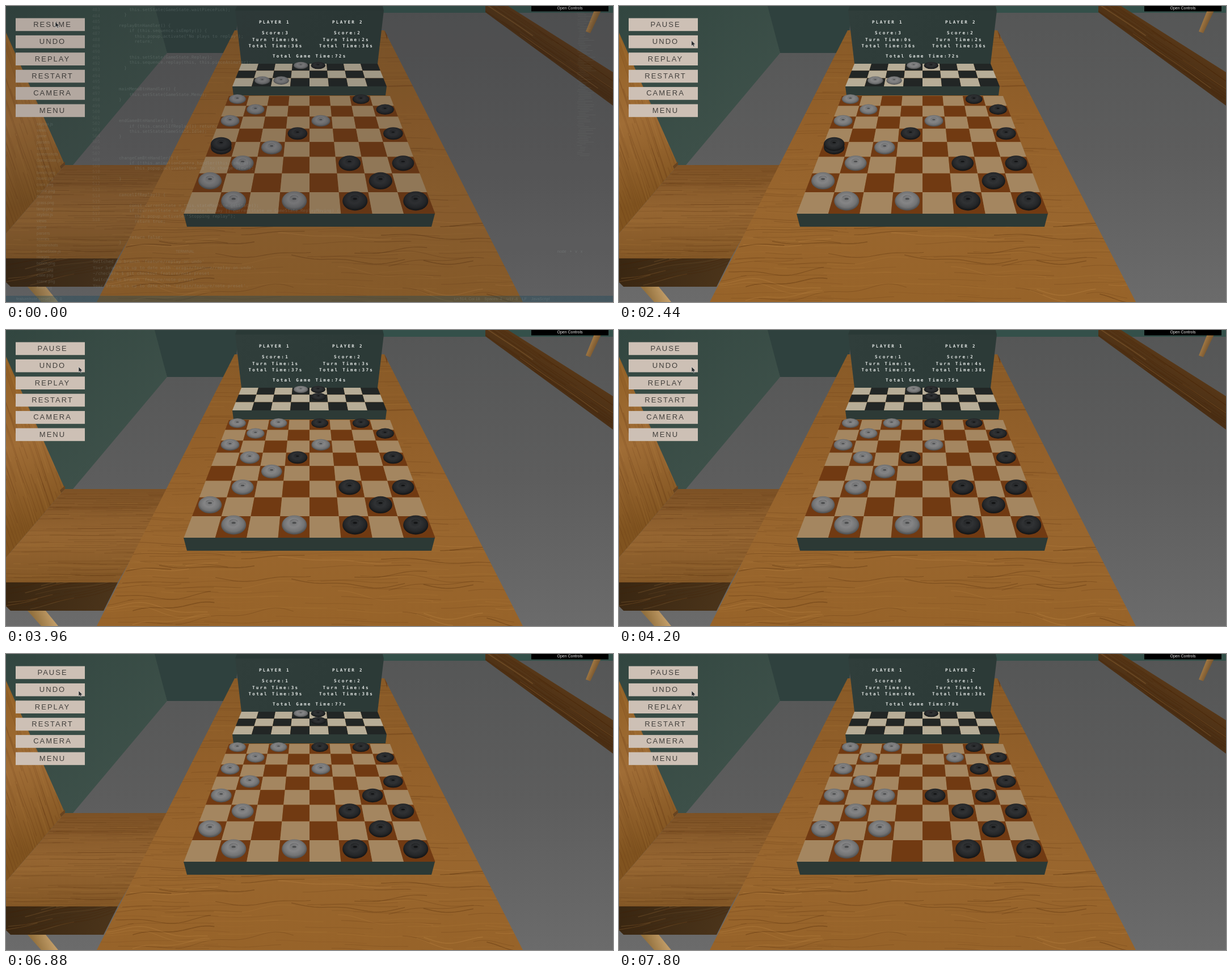
Recreate the animation shown at these times as an HTML page with a canvas. Size 1070 px wide and 523 px high, loop 8000 ms.

```html
<!DOCTYPE html>
<html lang="en">
<head>
<meta charset="utf-8">
<title>Checkers undo</title>
<style>
html, body { margin: 0; width: 100%; height: 100%; overflow: hidden; background: #555; }
canvas { display: block; }
</style>
</head>
<body>
<canvas id="stage" width="1070" height="523"></canvas>
<script>
const W = 1070, H = 523, LOOP = 8000;
const stage = document.getElementById('stage').getContext('2d');
let g = stage;

const SANS = '"Liberation Sans", Arial, sans-serif';
const MONO = '"DejaVu Sans Mono", monospace';

function random(seed) {
  return () => (seed = (seed * 16807) % 2147483647) / 2147483647;
}

function layer(paint) {
  const c = document.createElement('canvas');
  c.width = W;
  c.height = H;
  g = c.getContext('2d');
  paint();
  g = stage;
  return c;
}

function trace(p) {
  g.beginPath();
  for (let i = 0; i < p.length; i += 2) g.lineTo(p[i], p[i + 1]);
  g.closePath();
}

function poly(p, fill) {
  trace(p);
  g.fillStyle = fill;
  g.fill();
}

function fade(x0, y0, x1, y1, ...colors) {
  const grad = g.createLinearGradient(x0, y0, x1, y1);
  colors.forEach((c, i) => grad.addColorStop(i / (colors.length - 1), c));
  return grad;
}

function text(s, x, y, font, color, spacing = 0, align = 'left') {
  g.font = font;
  g.letterSpacing = spacing + 'px';
  g.fillStyle = color;
  g.textAlign = align;
  g.textBaseline = 'middle';
  g.fillText(s, x, y);
}

// Wavy streaks running along an angle, clipped to a polygon
function grain(p, { x, y, w, h, angle = 0, count, seed, alpha, bend }) {
  const rnd = random(seed);
  g.save();
  trace(p);
  g.clip();
  g.translate(x, y);
  g.rotate(angle);
  for (let i = 0; i < count; i++) {
    const depth = rnd(), y0 = depth * h, x0 = rnd() * w - 40;
    const len = 50 + rnd() * 170, phase = rnd() * 6;
    const amp = bend * (0.3 + depth);
    g.beginPath();
    for (let s = 0; s <= len; s += 8) {
      const u = x0 + s;
      g.lineTo(u, y0 + amp * Math.sin(u / 55 + phase) + amp * 0.4 * Math.sin(u / 19));
    }
    g.lineWidth = 0.6 + rnd() * 1.1;
    g.strokeStyle = rnd() < 0.7 ? `rgba(70,34,6,${alpha})` : `rgba(205,150,80,${alpha * 0.7})`;
    g.stroke();
  }
  g.restore();
}

// Perspective grid of 8 columns: y range and half widths at both ends
function grid(y0, y1, h0, h1, rows) {
  return (r, c) => {
    const k = 1 / (1 / h0 + (1 / h1 - 1 / h0) * r / rows);
    return [535 + (c - 4) * k / 4, y0 + (k - h0) / (h1 - h0) * (y1 - y0), k];
  };
}
const board = grid(159, 367, 142, 221.5, 8);
const tray = grid(102, 142, 120, 136, 3);

function checker(at, rows, even, odd) {
  for (let r = 0; r < rows; r++) {
    for (let c = 0; c < 8; c++) {
      const cell = [[r, c], [r, c + 1], [r + 1, c + 1], [r + 1, c]];
      poly(cell.flatMap(([a, b]) => at(a, b).slice(0, 2)), (r + c) % 2 ? odd : even);
    }
  }
}

function paintRoom() {
  g.fillStyle = fade(0, 0, 0, H, '#555656', '#5d5d5d', '#6b6b6b');
  g.fillRect(0, 0, W, H);
  poly([0, 0, 265, 0, 284, 83, 118, 281, 0, 281], fade(0, 0, 200, 200, '#324640', '#3d5049'));
  poly([262, 0, 410, 0, 403, 83, 284, 83], '#2f413e');
  poly([660, 0, W, 0, W, 12, 660, 12], '#34504a');

  const beam = [845, 0, 885, 0, W, 117, W, 176, 845, 11];
  poly([1040, 0, 1053, 0, 1030, 48, 1022, 45], fade(1028, 20, 1042, 26, '#ad8148', '#76552e'));
  poly(beam, fade(930, 80, 960, 30, '#4a2f15', '#5c3a18'));
  grain(beam, { x: 840, y: -25, w: 300, h: 75, angle: 0.6, count: 45, seed: 5, alpha: 0.3, bend: 1.5 });

  const back = [0, 47, 104, 281, 0, 402];
  poly(back, fade(0, 60, 90, 330, '#936126', '#a06d36', '#80531f'));
  grain(back, { x: 0, y: 20, w: 360, h: 160, angle: 1.25, count: 60, seed: 8, alpha: 0.14, bend: 1 });
  grain(back, { x: 100, y: 60, w: 360, h: 160, angle: 1.25, count: 60, seed: 9, alpha: 0.14, bend: 1 });

  poly([38, 496, 70, 496, 92, H, 62, H], fade(50, 512, 78, 500, '#93713e', '#c09b66'));
  const seat = [104, 281, 290, 281, 197, 446, 0, 446, 0, 402];
  poly(seat, fade(0, 281, 0, 446, '#7c5125', '#956531', '#835726'));
  grain(seat, { x: 0, y: 281, w: 300, h: 165, count: 150, seed: 12, alpha: 0.13, bend: 1 });
  const front = [0, 446, 197, 446, 172, 496, 8, 496, 0, 488];
  poly(front, fade(0, 446, 197, 496, '#392611', '#4c351b'));
  grain(front, { x: 0, y: 446, w: 200, h: 50, angle: -0.2, count: 30, seed: 15, alpha: 0.25, bend: 3 });
  poly([95, 283, 104, 275, 104, 281, 97, 288], '#684420');

  const table = [403, 43, 667, 43, 911, H, 160, H];
  poly(table, fade(0, 43, 0, H, '#885a27', '#93602a', '#99662e', '#976329'));
  grain(table, { x: 150, y: 43, w: 780, h: 480, count: 260, seed: 21, alpha: 0.13, bend: 2 });
  grain(table, { x: 150, y: 380, w: 780, h: 145, count: 42, seed: 32, alpha: 0.3, bend: 9 });
  poly([667, 43, 672, 52, 672, 60], '#6d401c');

  poly([407, 0, 664, 0, 666, 8, 404, 8], '#2a3936');
  poly([404, 8, 666, 8, 655, 102, 415, 102], fade(404, 8, 600, 102, '#303e3b', '#2c3a37'));
  checker(tray, 3, '#b7ad97', '#222625');
  poly([399, 142, 671, 142, 669, 158, 401, 158], '#2d3a36');
  checker(board, 8, '#713a12', '#a48660');
  poly([313, 367, 756, 367, 750, 390, 319, 390], '#2c3935');

  g.fillStyle = '#000';
  g.fillRect(926, 0, 136, 9.5);
  text('Open Controls', 994, 4, '7px ' + SANS, '#e8e8e8', 0, 'center');
}

const CODE = `    this.setState(GameState.waitPiecePick);
  }

replayBtnHandler() {
    if (this.sequence.isEmpty()) {
      this.popup.activate("No plays to replay");
      return;

    this.setState(GameState.Replay);
    this.sequence.replay(this, this.pieceAnimator);
  }

mainMenuBtnHandler() {
    this.setState(GameState.Menu);
}

endGameBtnHandler() {
    if (this.cancelIfReplay()) return;
    this.setState(GameState.Idle);
}

changeCamBtnHandler() {
    if (!this.animationCamera.handler(this.camera))
      this.popup.activate("Use 'z' to change view");

}

cancelIfReplay() {
    const currentState = this.stateMachine.getState();
    if (currentState == GameState.Replay || currentState == GameState.ReplayMoving) {
      this.popup.activate("Stopping replay");
      return true;

    return false;
}`.split('\n');
// Rows left blank before each code line would otherwise break the pitch
const CODE_GAPS = { 8: 1, 12: 2, 16: 2, 20: 2, 26: 1, 28: 1, 33: 1 };
const FILES = ['skybox.js', 'views', 'game', 'parsers', 'scenes', 'screenshots', 'GameState.js', 'images', 'bench.png', 'board.jpg', 'crate.png', 'scene.png', 'floor.png', 'grass.png', 'lamp.png'];
const TERMINAL = [
  "Switched to branch 'feature/replay-on-undo'",
  "Your branch is up to date with 'origin/feature/replay-on-undo'.",
  '~/checkers $ git checkout feature/note-preset',
  "Switched to branch 'feature/note-preset'",
  "Your branch is up to date with 'origin/feature/note-preset'."
];

function paintPause() {
  g.fillStyle = 'rgba(35,38,42,.15)';
  g.fillRect(0, 0, W, H);
  g.fillStyle = 'rgba(22,72,92,.35)';
  g.fillRect(0, 512, W, 11);
  const ink = 'rgba(165,175,170,.24)', font = '7.6px ' + MONO;
  let row = 0;
  CODE.forEach((line, i) => {
    row += CODE_GAPS[i] || 0;
    text(line, 199, 7 + row++ * 9.35, font, ink);
  });
  for (let i = 0; i < 36; i++) text(String(483 + i), 152, 7 + i * 10.6, font, 'rgba(165,175,170,.15)');
  for (let i = 0; i < 28; i++) text(FILES[i % 15], 54, 209 + i * 10.7, '7px ' + SANS, ink);
  text('TERMINAL', 299, 434, '6.5px ' + SANS, ink);
  TERMINAL.forEach((line, i) => text(line, 153, 452 + i * 10.7, font, ink));
  text('feature/note-preset     0  0', 18, 518, '7px ' + SANS, ink);
  text('Ln 514, Col 18    Spaces: 4    UTF-8    LF    JavaScript', 790, 518, '7px ' + SANS, ink);
  text('node   +   v   x', 972, 434, '7px ' + SANS, ink);
  const rnd = random(40);
  g.fillStyle = 'rgba(170,180,170,.08)';
  for (let y = 12; y < 265; y += 3) g.fillRect(1006 + rnd() * 6, y, 8 + rnd() * 22, 1);
}

function piece(at, r, c, dark, lift = 0) {
  const [x, y, k] = at(r + 0.5, c + 0.5);
  const rx = k * 0.103, ry = rx * (0.57 + (k - 145) / 345);
  const [hi, mid, low] = dark ? ['#303234', '#242628', '#121314'] : ['#858586', '#727374', '#4b4c4d'];
  g.save();
  g.translate(x, y - 3 - lift);
  g.scale(rx, ry);
  const grad = g.createRadialGradient(-0.1, -0.25, 0, 0, -0.1, 1.1);
  grad.addColorStop(0, mid);
  grad.addColorStop(0.4, hi);
  grad.addColorStop(0.75, mid);
  grad.addColorStop(1, low);
  g.fillStyle = grad;
  g.beginPath();
  g.arc(0, 0, 1, 0, 7);
  g.fill();
  g.fillStyle = low;
  g.beginPath();
  g.ellipse(0, -0.22, 0.16, 0.1, 0, 0, 7);
  g.fill();
  g.strokeStyle = low;
  g.lineWidth = 0.05;
  g.globalAlpha = 0.5;
  g.beginPath();
  g.arc(0, -0.2, 0.36, 3.6, 5.8);
  g.stroke();
  g.restore();
}

const RESUME = 2320, UNCROWN = 2680;
const LIGHT = '00 11 20 24 42 51 60 71 73', DARK = '06 17 33 37 40 55 57 66 75 77';
// Undone moves: time, from, to, captured squares given back
const UNDO = [
  [UNCROWN, '40', '04', '13 31'],
  [3960, '13', '02'],
  [5000, '55', '46'],
  [5600, '51', '40'],
  [6080, '33', '44'],
  [6440, '42', '51'],
  [6760, '44', '55'],
  [7040, '24', '42', '33'],
  [7280, '33', '44'],
  [7520, '73', '62'],
  [7720, '04', '26', '15']
];
// Clock ticks: time, player
const TICKS = [[2480, 1], [3120, 0], [4200, 1], [5320, 0], [6440, 0], [7520, 0]];

function position(t) {
  const squares = new Map();
  const put = (list, dark) => list.split(' ').forEach(s => squares.set(s, dark));
  put(LIGHT, false);
  put(DARK, true);
  const score = [3, 2];
  for (const [time, from, to, back] of UNDO) {
    if (t < time) break;
    const dark = squares.get(from);
    squares.delete(from);
    squares.set(to, dark);
    if (back) {
      put(back, !dark);
      score[dark ? 0 : 1] -= back.split(' ').length;
    }
  }
  return { squares, score };
}

function drawPieces(t, { squares, score }) {
  const crowned = t < UNCROWN;
  [[0, 3], [2, 1], [2, 2]].slice(0, score[0]).forEach(([r, c]) => piece(tray, r, c, false));
  [[0, 4], [1, 4]].slice(0, crowned ? 1 : score[1]).forEach(([r, c]) => piece(tray, r, c, true));
  for (const [square, dark] of [...squares].sort()) {
    const [r, c] = [...square].map(Number);
    piece(board, r, c, dark);
    if (crowned && square === '40') piece(board, r, c, true, 6);
  }
}

function drawScores(t, score) {
  const ticks = [0, 0];
  for (const [time, player] of TICKS) if (t >= time) ticks[player]++;
  const line = (s, x, y) => text(s, x, y, 'bold 7.6px ' + MONO, '#e4e8e6', 2.3);
  [0, 1].forEach(p => {
    const x = p * 124.5;
    line('PLAYER ' + (p + 1), 446 + p * 129, 29);
    line('Score:' + score[p], 451 + p * 127, 48.5);
    line(`Turn Time:${p * 2 + ticks[p]}s`, 434 + x, 60);
    line(`Total Time:${36 + ticks[p]}s`, 427.5 + x, 71);
  });
  line(`Total Game Time:${72 + ticks[0] + ticks[1]}s`, 470, 89);
}

function drawButtons(paused) {
  [paused ? 'RESUME' : 'PAUSE', 'UNDO', 'REPLAY', 'RESTART', 'CAMERA', 'MENU'].forEach((label, i) => {
    const y = 21.5 + i * 30.4;
    g.fillStyle = '#cdc0b5';
    g.fillRect(17, y, 122, 22.7);
    text(label, 82, y + 11.8, '13px ' + SANS, '#43403d', 2, 'center');
  });
}

function drawCursor(t) {
  const ease = (a, b) => {
    const u = Math.min(1, Math.max(0, (t - a) / (b - a)));
    return u * u * (3 - 2 * u);
  };
  const across = ease(320, 720), down = ease(2320, 2480);
  g.save();
  g.translate(87 + 39 * across + 2 * down, 28 + 11 * across + 26 * down);
  trace([0, 0, 0, 9.5, 2.2, 7.6, 3.8, 11, 5.5, 10.2, 4, 7, 7, 7]);
  g.fillStyle = '#26282a';
  g.fill();
  g.strokeStyle = 'rgba(225,225,225,.75)';
  g.lineWidth = 0.8;
  g.stroke();
  g.restore();
}

const room = layer(paintRoom);
const pause = layer(paintPause);

function draw(now) {
  const t = now % LOOP, paused = t < RESUME;
  const state = position(t);
  g.drawImage(room, 0, 0);
  drawPieces(t, state);
  drawButtons(paused);
  if (paused) g.drawImage(pause, 0, 0);
  drawScores(t, state.score);
  drawCursor(t);
}

const start = performance.now();
function tick() {
  draw(performance.now() - start);
  requestAnimationFrame(tick);
}
tick();
</script>
</body>
</html>
```
